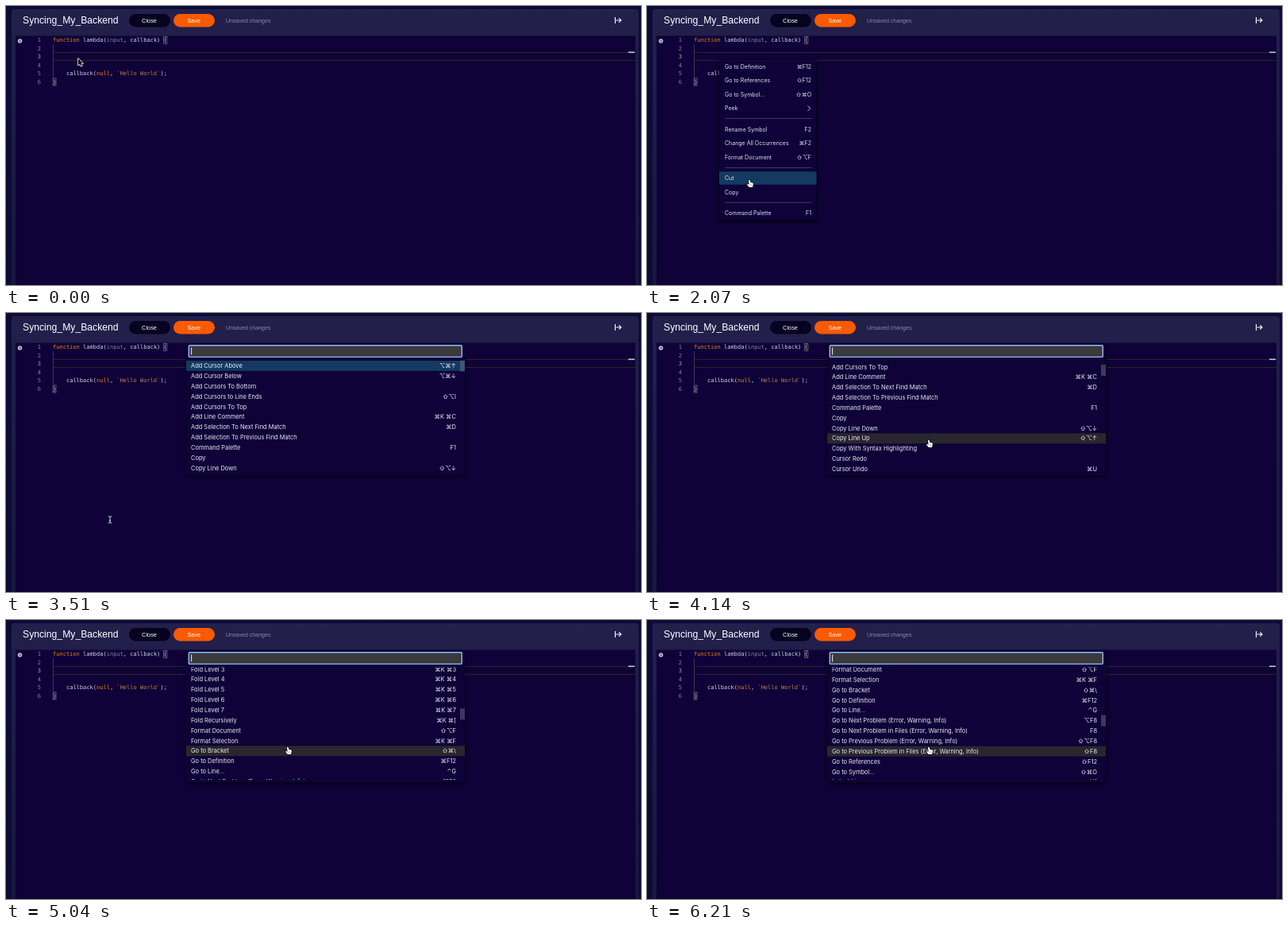
Animation, 800 px wide and 351 px high, one loop 8 s. Source, as an HTML page with a canvas:

```html
<!DOCTYPE html>
<html lang="en">
<head>
<meta charset="utf-8">
<title>Command palette</title>
<style>
  html, body { margin: 0; width: 100%; height: 100%; overflow: hidden; background: #0d0b38; }
  canvas { display: block; width: 800px; height: 351px; }
</style>
</head>
<body>
<canvas id="stage"></canvas>
<script>
const LOOP = 8000, STEP = 90, LAST = 6210;
const MENU_OPEN = 867, MENU_CLOSE = 2790, PALETTE_OPEN = 2880;
const UI = 'Inter, "DejaVu Sans", sans-serif';
const HEAD = '"Liberation Sans", Arial, sans-serif';
const MONO = '7.03px "DejaVu Sans Mono", monospace';
const EDITOR = '#0e0239', FOCUS = '#143a61';

const canvas = document.getElementById('stage');
const dpr = window.devicePixelRatio || 1;
canvas.width = 800 * dpr;
canvas.height = 351 * dpr;
const c = canvas.getContext('2d');

const frameFill = c.createLinearGradient(0, 0, 0, 351);
frameFill.addColorStop(0, '#23204c');
frameFill.addColorStop(0.12, '#211e4a');
frameFill.addColorStop(1, '#19163f');

// label, shortcut, vertical centre
const menu = [
  ['Go to Definition', '⌘F12', 76], ['Go to References', '⇧F12', 93.5],
  ['Go to Symbol...', '⇧⌘O', 111], ['Peek', '', 128.5],
  ['Rename Symbol', 'F2', 155], ['Change All Occurrences', '⌘F2', 172.5],
  ['Format Document', '⇧⌥F', 190], ['Cut', '', 216.5], ['Copy', '', 234],
  ['Command Palette', 'F1', 260]
];

const commands = `Add Cursor Above|⌥⌘↑
Add Cursor Below|⌥⌘↓
Add Cursors To Bottom
Add Cursors to Line Ends|⇧⌥I
Add Cursors To Top
Add Line Comment|⌘K ⌘C
Add Selection To Next Find Match|⌘D
Add Selection To Previous Find Match
Command Palette|F1
Copy
Copy Line Down|⇧⌥↓
Copy Line Up|⇧⌥↑
Copy With Syntax Highlighting
Cursor Redo
Cursor Undo|⌘U
Cut
Delete All Left|⌘⌫
Delete All Right|⌃K
Delete Line|⇧⌘K
Developer: Force Retokenize
Developer: Inspect Tokens
Editor Font Zoom In
Editor Font Zoom Out
Editor Font Zoom Reset
Expand Selection|⌃⇧⌘→
Find|⌘F
Find Next|Enter
Find Next Selection|⌘F3
Find Previous|⇧Enter
Find Previous Selection|⇧⌘F3
Find With Selection|⌘E
Fold|⌥⌘[
Fold All|⌘K ⌘0
Fold All Block Comments|⌘K ⌘/
Fold All Regions|⌘K ⌘8
${[1, 2, 3, 4, 5, 6, 7].map(n => `Fold Level ${n}|⌘K ⌘${n}`).join('\n')}
Fold Recursively|⌘K ⌘[
Format Document|⇧⌥F
Format Selection|⌘K ⌘F
Go to Bracket|⇧⌘\\
Go to Definition|⌘F12
Go to Line...|⌃G
Go to Next Problem (Error, Warning, Info)|⌥F8
Go to Next Problem in Files (Error, Warning, Info)|F8
Go to Previous Problem (Error, Warning, Info)|⇧⌥F8
Go to Previous Problem in Files (Error, Warning, Info)|⇧F8
Go to References|⇧F12
Go to Symbol...|⇧⌘O
Indent Line|⌘]`.split('\n').map(s => s.split('|'));

// keys: [time, value...]
const pointerKeys = [[1710, 91, 66], [2070, 129, 219], [2430, 131, 260],
  [3510, 131, 260], [4050, 355, 160]];
const scrollKeys = [[4050, 0], [4320, 150], [4590, 337.1], [4860, 440],
  [5130, 500], [5400, 528.9], [5850, 545], [6210, 556.6]];

function track(keys, t) {
  if (t <= keys[0][0]) return keys[0].slice(1);
  const i = keys.findIndex(k => k[0] > t);
  if (i < 0) return keys[keys.length - 1].slice(1);
  const a = keys[i - 1], b = keys[i], u = (t - a[0]) / (b[0] - a[0]);
  return a.slice(1).map((v, j) => v + (b[j + 1] - v) * u);
}

function rect(x, y, w, h, color) {
  c.fillStyle = color;
  c.fillRect(x, y, w, h);
}

function round(x, y, w, h, r, fill, stroke) {
  c.beginPath();
  c.roundRect(x, y, w, h, r);
  c.fillStyle = fill;
  c.fill();
  if (stroke) { c.strokeStyle = stroke; c.stroke(); }
}

// y is the middle of the capitals
function text(s, x, y, color, font, align = 'left') {
  c.font = font;
  c.textAlign = align;
  c.fillStyle = color;
  c.fillText(s, x, y + parseFloat(font) * 0.365);
}

function path(d, fill, stroke, width = 1) {
  const p = new Path2D(d);
  c.lineWidth = width;
  if (stroke) { c.strokeStyle = stroke; c.stroke(p); }
  if (fill) { c.fillStyle = fill; c.fill(p); }
}

function panel(x, y, w, h, color) {
  c.save();
  c.shadowColor = '#000';
  c.shadowBlur = 5 * dpr;
  c.shadowOffsetY = 1.5 * dpr;
  rect(x, y, w, h, color);
  c.restore();
}

function header() {
  rect(0, 0, 800, 351, '#0d0b38');
  round(7, 4, 790, 360, 4, frameFill);
  rect(12, 37.5, 781, 314, EDITOR);
  text('Syncing_My_Backend', 21, 18, '#fff', '12.2px ' + HEAD);
  round(155, 10, 52, 16.5, 8.25, '#06021f');
  round(211, 10, 52, 16.5, 8.25, '#fa5a00');
  text('Close', 180.5, 18, '#fff', '7.4px ' + HEAD, 'center');
  text('Save', 236.8, 18, '#fff', '7.4px ' + HEAD, 'center');
  text('Unsaved changes', 277, 18.5, '#8b89a3', '7.05px ' + HEAD);
  path('M767.5 14V22M768.5 18H775M772.3 15.3L775 18L772.3 20.7', null, '#fff', 1.1);
}

function code(line, col, s, color) {
  text(s, 59 + col * 4.232, 42.8 + (line - 1) * 10.52, color, MONO);
}

function editor() {
  round(14.7, 41.2, 5.6, 5.6, 2.8, '#b9b7c8');
  path('M16.4 43.2L18.6 44.8', null, EDITOR, 0.9);
  rect(59, 58, 734, 1, '#2a271f');
  rect(59, 68, 734, 1, '#2a271f');
  rect(59, 48, 0.8, 42, '#454158');
  rect(784, 57.5, 8, 1.6, '#c5c3d2');
  for (let n = 1; n <= 6; n++)
    text(String(n), 44, 42.8 + (n - 1) * 10.52, n === 3 ? '#a9a7b5' : '#85839a', MONO, 'right');
  c.lineWidth = 0.8;
  c.strokeStyle = '#74727c';
  c.strokeRect(198.6, 38.4, 4.2, 9);
  c.strokeRect(59.2, 91, 3.8, 9);
  const plain = '#d5d3df', orange = '#ee850d';
  code(1, 0, 'function', orange);
  code(1, 9, 'lambda(', plain);
  code(1, 16, 'input', '#89859b');
  code(1, 21, ', callback) {', plain);
  code(5, 4, 'callback(', plain);
  code(5, 13, 'null', orange);
  code(5, 17, ', ', plain);
  code(5, 19, '`Hello World`', '#c8803d');
  code(5, 32, ');', plain);
  code(6, 0, '}', plain);
}

function contextMenu(t, px, py) {
  const font = '7px ' + UI;
  c.save();
  c.globalAlpha = Math.min(1, (t - MENU_OPEN) / 83);
  panel(91, 68.5, 122.5, 200.5, EDITOR);
  for (const [label, keys, y] of menu) {
    if (px > 91 && Math.abs(py - y) < 8.5) rect(91, y - 8.2, 122.5, 16.4, FOCUS);
    text(label, 98, y, '#e3e1ec', font);
    text(keys, 207, y, '#e3e1ec', font, 'right');
  }
  for (const y of [141, 203, 246.8]) rect(98, y, 110, 0.8, '#4c4960');
  path('M202.5 125.5L205.8 128.7L202.5 131.9', null, '#d5d3df', 0.9);
  c.restore();
}

function palette(t, px, py) {
  const font = '7.46px ' + UI, row = 12.85, top = 59.5;
  const [scroll] = track(scrollKeys, t);
  panel(227, 38, 351, 166.5, EDITOR);
  c.lineWidth = 1.4;
  round(230.3, 40.8, 344, 14.6, 1.2, '#3a3a3c', '#94b5fb');
  if ((t - 2733) % 667 < 333) rect(233.2, 43.5, 0.9, 9, '#fff');
  c.save();
  c.beginPath();
  c.rect(227, top, 351, 141.5);
  c.clip();
  commands.forEach(([label, keys = ''], i) => {
    const y = 66.4 + i * row - scroll;
    if (y < 50 || y > 212) return;
    const over = px > 227 && px < 578 && py < 202 && py >= y - row / 2 && py < y + row / 2;
    if (i === 0 || over) rect(227, y - row / 2, 351, row, i ? '#29272d' : FOCUS);
    text(label, 233, y, '#eceaf2', font);
    text(keys, 567, y, '#eceaf2', font, 'right');
  });
  rect(572, top + scroll * 0.108, 6, 14, 'rgba(121,121,140,.45)');
  c.restore();
}

function pointer(t, x, y) {
  const overMenu = t >= 1800 && t < MENU_CLOSE;
  const overList = t >= PALETTE_OPEN && x > 227 && y < 204;
  c.save();
  c.translate(x, y);
  c.lineJoin = 'round';
  if (overMenu || overList) {
    path('M-1 0Q.1 -.8 .8 .4L1.5 3L3.8 3.3Q5 3.8 4.8 5.6L4 9H-.2L-2.8 6Q-3.3 4.8-2 4.9L-.4 5.8Z',
      '#fff', '#080513', 1.3);
    path('M1.6 5.2V7.4M3 5.2V7.4', null, '#555', 0.4);
  } else if (t < MENU_CLOSE) {
    path('M0 0V8.4L2 6.7L3.3 9.7L4.8 9L3.5 6.2H6Z', '#08050f', '#fff', 1.5);
  } else {
    path('M-2.2 -4.3Q0 -4.3 0 -3Q0 -4.3 2.2 -4.3M0 -3V3M-2.2 4.3Q0 4.3 0 3Q0 4.3 2.2 4.3M-1 1.2H1',
      null, '#e8e6ee', 0.9);
  }
  c.restore();
}

function draw(now) {
  let t = now % LOOP;
  t = Math.min(LAST, t - t % STEP);
  const [px, py] = track(pointerKeys, t);
  c.setTransform(dpr, 0, 0, dpr, 0, 0);
  header();
  editor();
  if (t > MENU_OPEN && t < MENU_CLOSE) contextMenu(t, px, py);
  if (t >= PALETTE_OPEN) palette(t, px, py);
  pointer(t, px, py);
}

const start = performance.now();
function frame() {
  draw(performance.now() - start);
  requestAnimationFrame(frame);
}
frame();
</script>
</body>
</html>
```
